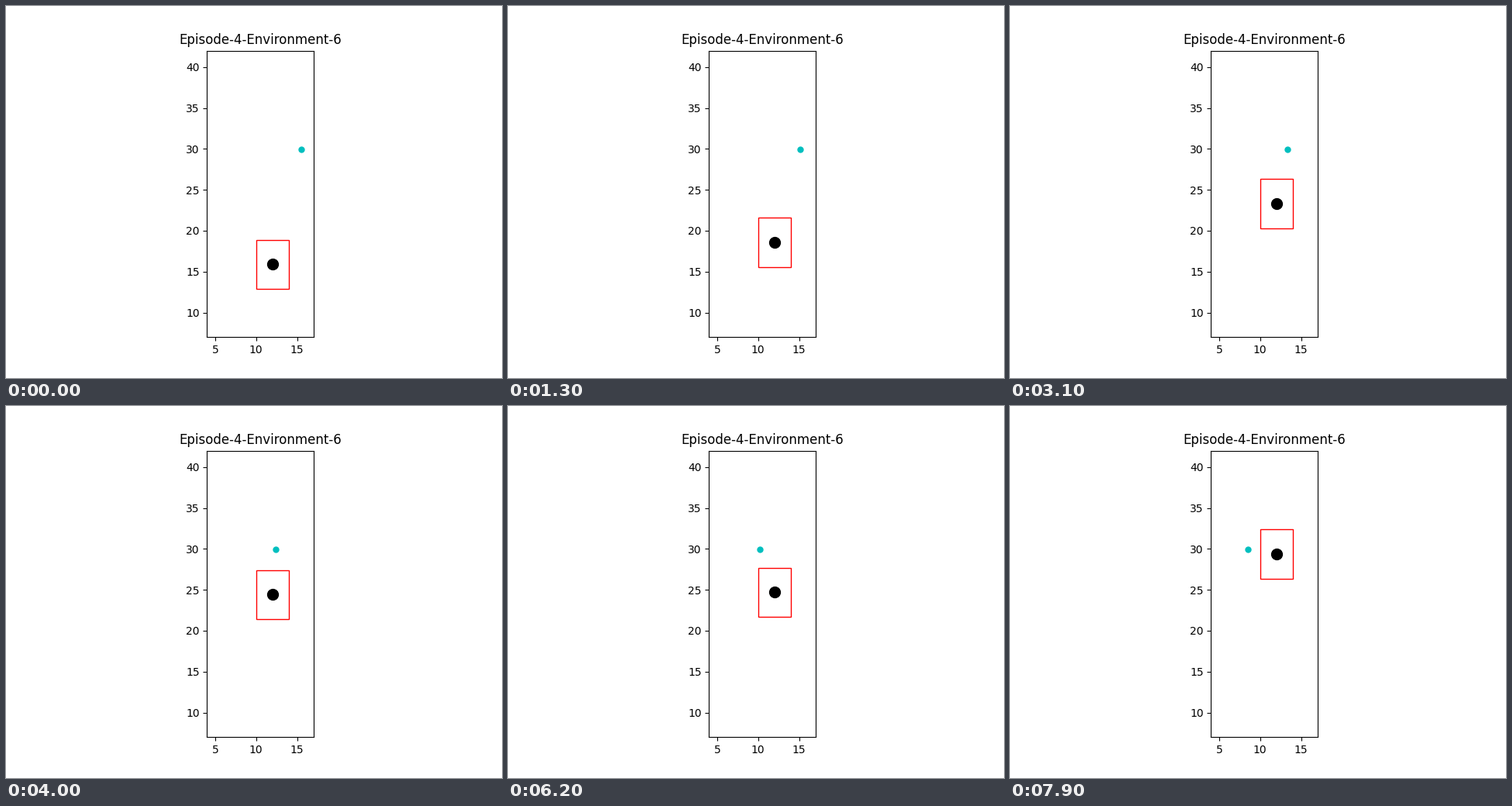
These frames come from a looping animation (640x480 px, 8000 ms). A matplotlib script:

```python
import matplotlib.pyplot as plt
from matplotlib.animation import FuncAnimation
from matplotlib.patches import Rectangle

FRAMES, STEP_MS = 80, 100
BOX_W, BOX_H = 4, 6
CAR_X, WALKER_Y = 12, 29.9
WALK_START, WALK_STEP = 9, 0.1


def cruise(s):
    return s


def brake(s):
    return 1 - (1 - s) ** 1.5


def speed_up(s):
    return s ** 1.84


# The car drives up, brakes for the walker, rolls back a little, then drives on
START_Y = 15.89
LEGS = [(13, 18.572, cruise), (23, 21.572, cruise), (40, 24.413, brake),
        (54, 24.034, cruise), (79, 29.368, speed_up)]


def car_y(i):
    t0, y0 = 0, START_Y
    for t1, y1, ease in LEGS:
        if i <= t1:
            return y0 + (y1 - y0) * ease((i - t0) / (t1 - t0))
        t0, y0 = t1, y1
    return y0


def walker_x(i):
    return 15.5 - WALK_STEP * max(0, i - WALK_START)


fig, ax = plt.subplots(figsize=(6.4, 4.8), dpi=100)
ax.set_aspect("equal")
ax.set_xlim(4, 17)
ax.set_ylim(7, 42)
ax.set_title("Episode-4-Environment-6")

box = ax.add_patch(Rectangle((0, 0), BOX_W, BOX_H, fill=False, ec="red", lw=1))
car, = ax.plot([], [], "ko", ms=10)
walker, = ax.plot([], [], "co", ms=5)


def update(i):
    y = car_y(i)
    box.set_xy((CAR_X - BOX_W / 2, y - BOX_H / 2))
    car.set_data([CAR_X], [y])
    walker.set_data([walker_x(i)], [WALKER_Y])
    return box, car, walker


anim = FuncAnimation(fig, update, frames=FRAMES, interval=STEP_MS,
                     repeat=True, repeat_delay=0)
plt.show()
```
